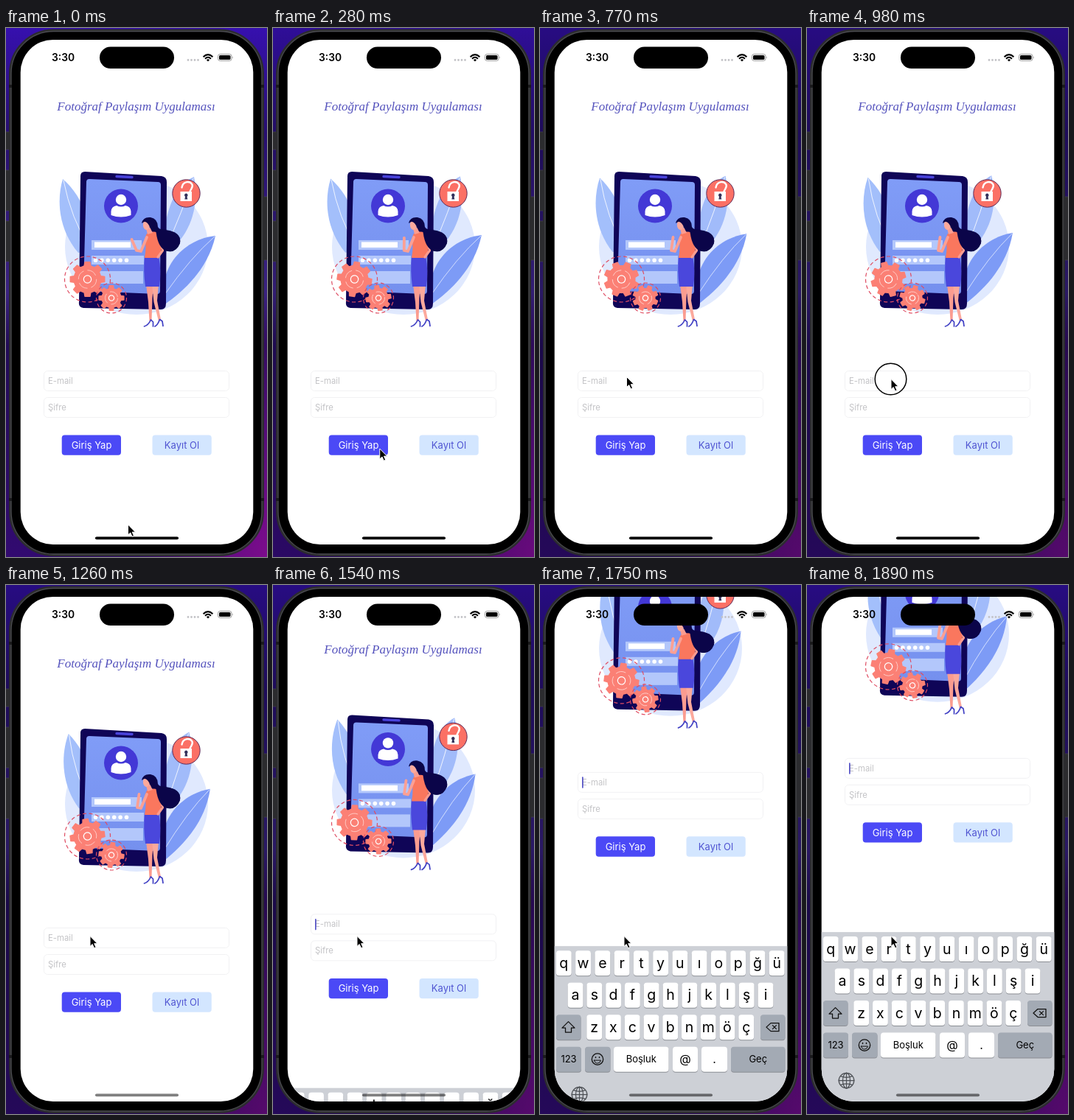
An HTML page for the animation above (1960 ms loop, 354 by 718 pixels).

```html
<!DOCTYPE html>
<html lang="tr">
<head>
<meta charset="utf-8">
<style>
  html, body { margin: 0; width: 100%; height: 100%; overflow: hidden; background: #1b0a58; }
  svg { display: block; width: 100%; height: 100%; }
  text { font-family: Inter, "Liberation Sans", sans-serif; }
  .mid { text-anchor: middle; }
  .title { font: italic 17px "Liberation Serif", serif; fill: #5553bd; }
  .hint { font-size: 11.3px; fill: #c3c3c6; }
  .field { fill: #fff; stroke: #f1f1f3; }
  .btn { font-size: 13px; }
  .line { fill: none; stroke-linecap: round; stroke-linejoin: round; }
</style>
</head>
<body>
<svg viewBox="0 0 354 718" preserveAspectRatio="none">
  <defs>
    <linearGradient id="wall" x2="0" y2="1">
      <stop offset="0" stop-color="#3610ae"/><stop offset=".2" stop-color="#270e70"/>
      <stop offset=".5" stop-color="#3a2280"/><stop offset=".6" stop-color="#220b57"/>
      <stop offset="1" stop-color="#320a70"/>
    </linearGradient>
    <radialGradient id="glow" cx="1" cy="1" r=".5">
      <stop offset="0" stop-color="#7c0c8c"/><stop offset="1" stop-color="#7c0c8c" stop-opacity="0"/>
    </radialGradient>
    <linearGradient id="panel" x2="0" y2="1">
      <stop offset="0" stop-color="#809cf7"/><stop offset="1" stop-color="#7590ee"/>
    </linearGradient>
    <clipPath id="screen"><rect x="19.7" y="16" width="315.6" height="685" rx="44"/></clipPath>
  </defs>

  <!-- wallpaper and device body -->
  <rect width="354" height="718" fill="url(#wall)"/>
  <rect width="354" height="718" fill="url(#glow)"/>
  <rect id="shade" width="354" height="718" fill="#0c0630"/>
  <g fill="#2b2b2e" stroke="#46464a" stroke-width=".6">
    <rect x="-2" y="141" width="8" height="24"/><rect x="-2" y="193" width="8" height="55"/>
    <rect x="-2" y="262" width="8" height="55"/><rect x="348" y="229" width="8" height="86"/>
  </g>
  <rect x="5.5" y="3" width="343" height="712.500" rx="59" fill="#000" stroke="#2c2c2f" stroke-width="3"/>
  <rect x="7" y="4.500" width="340" height="709.500" rx="57.5" fill="#000" stroke="#4b4c4f" stroke-width="1.3"/>
  <path d="M4 79h4M346 79h4M4 640h4M346 640h4" stroke="#1a1a1c" stroke-width="4"/>

  <g clip-path="url(#screen)">
    <rect x="19" y="16" width="317" height="685" fill="#fff"/>

    <g id="content">
      <text class="title mid" x="176.5" y="112">Fotoğraf Paylaşım Uygulaması</text>

      <ellipse cx="177" cy="297" rx="97" ry="92" fill="#e0e9fe"/>
      <g id="leftLeaf">
        <path d="M77 205C68 235 72 275 98 305L120 303C114 255 100 225 77 205Z" fill="#a3bffb"/>
        <path class="line" d="M78 207Q88 258 114 300" stroke="#fff" stroke-width=".8"/>
      </g>
      <g id="backLeaf">
        <path d="M255 202C232 212 216 240 212 300L225 300C252 275 262 240 255 202Z" fill="#a1bbfa"/>
        <path class="line" d="M254 204Q239 250 217 298" stroke="#fff" stroke-width=".8"/>
      </g>
      <g id="frontLeaf">
        <path d="M284 282C254 285 222 306 214 345L214 376C240 358 274 328 284 282Z" fill="#7d9bf6"/>
        <path class="line" d="M283 283Q250 312 215 362" stroke="#e6edff" stroke-width=".8"/>
      </g>

      <!-- drawn handset -->
      <path d="M107 195L211 201Q218 202 218 209L217 374Q217 382 210 382L105 380Q98 379 99 372L101 201Q101 195 107 195Z" fill="#0f0557"/>
      <path d="M113 205L206 209Q210 209 210 213L209 357Q209 361 205 361L109 357Q105 357 105 353L109 209Q109 205 113 205Z" fill="url(#panel)"/>
      <path class="line" d="M150 201.5L171 202.5" stroke="#4943dc" stroke-width="3.4"/>
      <circle cx="156" cy="241.5" r="23" fill="#4338d6"/>
      <g fill="#fff">
        <circle cx="156" cy="233" r="7.2"/>
        <path d="M142.500 254V249Q143 242 150 241Q156 244 162 241Q169 242 169.500 249V254Q156 259 142.500 254Z"/>
      </g>
      <g fill="#b3c7fb">
        <rect x="116" y="288" width="68" height="13"/><rect x="116" y="309" width="71" height="12"/>
        <rect x="116" y="330" width="70" height="17"/>
      </g>
      <rect x="120" y="290.500" width="49" height="7.500" fill="#fff"/>
      <path class="line" d="M121.500 315.200H164" stroke="#fff" stroke-width="5.600" stroke-dasharray="0 8.400"/>

      <!-- unlocked badge -->
      <circle cx="244.500" cy="224.500" r="18.700" fill="#fb7065" stroke="#5c2a58"/>
      <path class="line" d="M238.500 216.500C240 207 250 207.500 252.500 212.500C254 216 251 218 249.500 222" stroke="#fff" stroke-width="2.400"/>
      <rect x="236.500" y="222" width="15.500" height="13" fill="#fff"/>
      <path d="M244.300 224.500a2.400 2.400 0 0 1 1.200 4.400l.8 3.600h-4l.8-3.600a2.400 2.400 0 0 1 1.200-4.400Z" fill="#33305a"/>

      <g id="gears"></g>

      <!-- woman -->
      <path d="M184 265Q186 256 196 257Q206 259 206 270Q209 276 221 275Q238 279 236 292Q230 307 216 302Q201 298 198 276L190 262Z" fill="#0b0549"/>
      <path d="M190 348L200 348L198.500 366L197.500 397L194.500 398L193 372Z" fill="#fb9c90"/>
      <path d="M198 348L207 348L205 370L210 396L207 398L200.500 372Z" fill="#fca99c"/>
      <path class="line" d="M187.500 405Q193 403.500 196.500 396L199.500 399V405M202 405Q206 403 208.500 395.500L212 398L213 404.500" stroke="#4040c4" stroke-width="1.700"/>
      <path d="M188 311L207 309Q211 330 208 351L189 351Q186 328 188 311Z" fill="#4a47dc"/>
      <path d="M191 279Q202 273 210 281Q214 290 208 312L188 312Q191 296 188 286Z" fill="#fa775e"/>
      <path d="M190 272L196 271L199 278L192 280Z" fill="#fb9c90"/>
      <ellipse cx="190.500" cy="267" rx="4.600" ry="7" fill="#fca99c"/>
      <path d="M185 264Q190 261 194 268L198 276L202 266L194 258Q187 258 185 264Z" fill="#0b0549"/>
      <path class="line" d="M208.500 285L212.500 302L206 311" stroke="#fb9c90" stroke-width="3.200"/>
      <polyline id="arm" class="line" stroke="#fca094" stroke-width="3.800"/>
      <path d="M203 272Q213 273 222 275Q238 279 236 292Q230 307 216 302Q205 297 203 272Z" fill="#0b0549"/>

      <!-- form -->
      <rect class="field" x="51.500" y="465.500" width="251" height="27" rx="5"/>
      <rect class="field" x="51.500" y="501.500" width="251" height="27" rx="5"/>
      <text class="hint" x="57" y="483">E-mail</text>
      <text class="hint" x="57" y="519">Şifre</text>
      <rect id="caret" x="57" y="471.500" width="1.700" height="15.500" rx=".8" fill="#5654c8"/>
      <rect x="75.700" y="552.500" width="80.300" height="27.300" rx="4" fill="#4b49f6"/>
      <rect x="198.500" y="552.500" width="80.300" height="27.300" rx="4" fill="#d3e6ff"/>
      <text class="btn mid" x="116" y="571" fill="#fff">Giriş Yap</text>
      <text class="btn mid" x="238.500" y="571" fill="#5055d2">Kayıt Ol</text>
    </g>

    <g id="keyboard">
      <rect x="19" width="317" height="260" fill="#cdd0d6"/>
      <g id="keys"></g>
      <g class="line" stroke="#111" stroke-width="1.300">
        <path d="M38.500 102.500L47 111H42.500V117H34.500V111H30Z"/>
        <path d="M313 104.500H324V115.500H313L307 110ZM315.500 107.500L320.500 112.500M320.500 107.500L315.500 112.500"/>
        <circle cx="78" cy="153.500" r="7.700"/>
        <path d="M73.500 155H82.500Q81.500 159 78 159Q74.500 159 73.500 155Z" stroke-width="1"/>
        <path d="M75.500 150.500v.8M80.500 150.500v.8" stroke-width="1.500"/>
      </g>
      <g class="line" stroke="#4c4f54" stroke-width="1.200">
        <circle cx="53.500" cy="201.500" r="10.300"/><ellipse cx="53.500" cy="201.500" rx="5" ry="10.300"/>
        <path d="M53.500 191V212M43 201.500H64M45.500 195.500Q53.500 199 61.500 195.500M45.500 207.500Q53.500 204 61.500 207.500"/>
      </g>
    </g>
    <rect id="home" x="121" y="690.500" width="113" height="3.700" rx="1.850"/>
  </g>

  <!-- status bar -->
  <rect x="127" y="25.500" width="101" height="29.500" rx="14.750"/>
  <text x="62" y="45" font-size="13.800" font-weight="600">3:30</text>
  <path class="line" d="M247 43.500H261" stroke="#c3c3c7" stroke-width="2.800" stroke-dasharray="0 4.500"/>
  <g class="line" stroke="#000" stroke-width="2" style="stroke-linecap:butt">
    <path d="M267.600 39.200Q274 33 280.400 39.200M270 41.700Q274 37.800 278 41.700"/>
  </g>
  <path d="M271.900 43.200Q274 41.400 276.100 43.200L274 45.400Z"/>
  <rect x="287.500" y="35.500" width="18.500" height="9" rx="2.800" fill="none" stroke="#999"/>
  <rect x="289" y="37" width="15.500" height="6" rx="1.600"/>
  <path d="M307.300 38.500Q309 40 307.300 41.500Z" fill="#999"/>

  <circle id="tap" cx="113.500" cy="476.500" r="21.300" fill="none" stroke="#000" stroke-width="1.500"/>
  <path id="pointer" d="M0 0V14L3.200 11L5.600 16.300L8 15.200L5.700 10.200H10Z" stroke="#fff" stroke-width="1" stroke-linejoin="round"/>
</svg>

<script>
const LOOP = 1960, STEP = 70;
const $ = id => document.getElementById(id);
const clamp01 = x => Math.max(0, Math.min(1, x));
const mix = (a, b, k) => a + (b - a) * k;
const smooth = k => k * k * (3 - 2 * k);
const show = (id, on) => $(id).setAttribute("visibility", on ? "visible" : "hidden");
const move = (id, value) => $(id).setAttribute("transform", value);

function gearPath(teeth, outer, inner) {
  const points = [];
  for (let i = 0; i < teeth; i++)
    for (const [offset, r] of [[-.30, inner], [-.19, outer], [.19, outer], [.30, inner]]) {
      const a = (i + offset) / teeth * 2 * Math.PI;
      points.push((r * Math.cos(a)).toFixed(2) + " " + (r * Math.sin(a)).toFixed(2));
    }
  return "M" + points.join("L") + "Z";
}

const gears = [
  { x: 110.5, y: 341, outer: 23.5, inner: 18.5, ring: 31, speed: 30 },
  { x: 143, y: 366.5, outer: 17, inner: 13, ring: 20.5, speed: -30 }
];
$("gears").innerHTML = gears.map((g, i) => `
  <g id="gear${i}">
    <circle r="${g.ring}" fill="none" stroke="#df4d63" stroke-width="1.2" stroke-dasharray="5 3.5"/>
    <path d="${gearPath(8, g.outer, g.inner)}" fill="#fb8075" stroke="#fb8075" stroke-width="1.5" stroke-linejoin="round"/>
    <circle r="${g.inner * .66}" fill="none" stroke="#ffd5cf" stroke-width=".8" stroke-dasharray="14 5"/>
    <circle r="${g.inner * .28}" fill="none" stroke="#fff" stroke-width="1.2"/>
  </g>`).join("");

function key(x, y, width, label = "", size = 20, fill = "#fff") {
  return `<rect x="${x}" y="${y + 1}" width="${width}" height="34" rx="4" fill="#8b8e94"/>
    <rect x="${x}" y="${y}" width="${width}" height="34" rx="4" fill="${fill}"/>
    <text class="mid" x="${x + width / 2}" y="${y + 17 + size * .33}" font-size="${size}">${label}</text>`;
}
const keyRow = (letters, firstCenter, pitch, y) =>
  [...letters].map((c, i) => key(firstCenter + i * pitch - 10.4, y, 20.8, c, 19.5)).join("");

const GREY = "#a3aab4";
$("keys").innerHTML =
  keyRow("qwertyuıopğü", 32.3, 26.26, 6) +
  keyRow("asdfghjklşi", 48, 25.8, 49.5) +
  key(22, 93, 33.5, "", 13, GREY) + keyRow("zxcvbnmöç", 73.7, 25.75, 93) + key(299, 93, 33.5, "", 13, GREY) +
  key(22, 136.5, 34, "123", 13, GREY) + key(61, 136.5, 34.5, "", 13, GREY) +
  key(100, 136.5, 74.5, "Boşluk", 13) + key(180, 136.5, 34, "@", 16) +
  key(219, 136.5, 35, ".", 16) + key(259, 136.5, 73.5, "Geç", 13, GREY);

// Critically damped spring that lifts the form together with the keyboard.
function lift(t) {
  const u = Math.max(0, t - 1512) / 1000 * 16.6;
  return 233.4 * (1 - (1 + u) * Math.exp(-u));
}

function pointerAt(t) {
  if (t < 560) {
    const k = smooth(clamp01(t / 560));
    return [mix(165.5, 124, k), mix(674, 468, k)];
  }
  const k = smooth(clamp01((t - 560) / 350));
  return [mix(124, 114, k), mix(468, 476.5, k)];
}

function draw(t) {
  const s = t / 1000;
  const sway = 1.9 * s + .9 * s * s;
  move("leftLeaf", `rotate(${sway} 125 320)`);
  move("backLeaf", `rotate(${-sway} 215 300)`);
  move("frontLeaf", `rotate(${-sway} 200 385)`);
  gears.forEach((g, i) => move("gear" + i, `translate(${g.x} ${g.y}) rotate(${g.speed * s})`));

  const reach = smooth(clamp01(t / 420));
  $("arm").setAttribute("points", `191,284 183,303 ${mix(177, 178, reach)},302 ${mix(170.5, 180.5, reach)},${mix(287, 284, reach)}`);

  const y = lift(t);
  move("content", `translate(0 ${-y})`);
  move("keyboard", `translate(0 ${701.3 - y})`);
  $("home").setAttribute("fill-opacity", t < 1260 ? 1 : .5);
  $("shade").setAttribute("opacity", mix(0, .35, clamp01(t / 560)));

  move("pointer", `translate(${pointerAt(t)})`);
  show("tap", t >= 910 && t < 1120);
  show("caret", t >= 1470);
}

function tick() {
  draw(Math.floor(performance.now() % LOOP / STEP) * STEP);
  requestAnimationFrame(tick);
}
tick();
</script>
</body>
</html>
```
